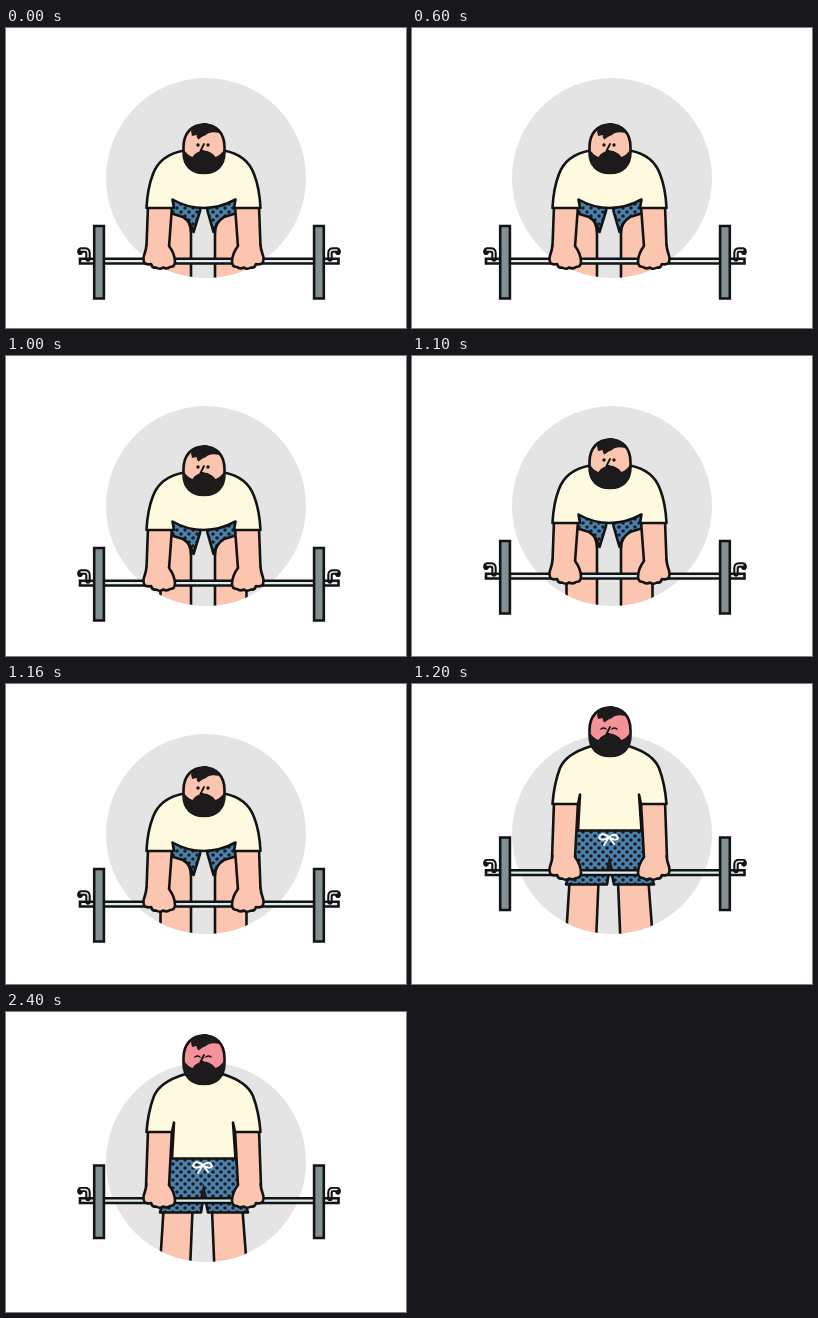
An HTML page that plays this animation: 400 px wide and 300 px high, repeating every 3.2 s.

```html
<!DOCTYPE html>
<html lang="en">
<head>
<meta charset="utf-8">
<title>Deadlift</title>
<style>
  html, body { margin: 0; width: 100%; height: 100%; overflow: hidden; background: #fff; }
  svg { display: block; width: 100vw; height: 100vh; }
  .line { stroke: #131313; stroke-width: 2.6; stroke-linejoin: round; stroke-linecap: round; fill: none; }
  .sharp { stroke-linejoin: miter; }
  .ink { fill: #1c1a1b; }
  .skin { fill: #fbc5b0; }
  .shirt { fill: #fefae0; }
  .shorts { fill: url(#dots); }
  .steel { fill: #819092; }
  .bar { fill: #dcecf0; }
</style>
</head>
<body>
<svg viewBox="0 0 400 300">
  <defs>
    <pattern id="dots" width="8" height="8" patternUnits="userSpaceOnUse" patternTransform="translate(1 2)">
      <path fill="#4a83b0" d="M0 0h8v8h-8z"/>
      <g class="ink"><circle cx="2" cy="2" r="1.8"/><circle cx="6" cy="6" r="1.8"/></g>
    </pattern>
    <clipPath id="disc"><circle cx="200" cy="150" r="100"/></clipPath>
    <g id="weight">
      <g fill="none" stroke-linecap="round">
        <path id="hook" d="M82 231V225Q82 222 79 222H75Q73.500 222 74 224.500" stroke="#131313" stroke-width="5"/>
        <use href="#hook"/>
        <path d="M82 229V225Q82 222 79 222H75" stroke="#e9f1f2" stroke-width="1.4"/>
      </g>
      <path class="line sharp steel" d="M88.200 198h9.700v72.500h-9.700z"/>
    </g>
    <path id="hand" class="line skin" d="M140.500 217Q140 222 138.500 226Q136.500 231 138.500 235Q141 237 145 236Q146.500 240.500 150 239.500Q154 242 157 239.500Q161 241.500 164 239Q169 239 169 233.500Q168.500 225 163 218"/>
  </defs>

  <circle cx="200" cy="150" r="100" fill="#e4e4e4"/>

  <g id="bent">
    <g clip-path="url(#disc)"><g class="bentBody">
      <path class="line skin" d="M154.500 290V190Q166 179 177 187Q185 193 185 206V290z"/>
      <path class="line skin" d="M240.500 290V190Q229 179 218 187Q209 193 209 206V290z"/>
    </g></g>
    <g class="bentBody">
      <path class="line shorts" d="M164 168H195.500L194 183L187.500 204Q184 193 177 189L164 185z"/>
      <path class="line shorts" d="M231 168H200L201.500 183L207.500 204Q211 193 218 189L231 185z"/>
    </g>
  </g>

  <g id="upright">
    <g clip-path="url(#disc)">
      <path class="line skin" d="M157.500 198L153 270H183.500L186.500 198zM206 198L209 270H242L236.500 198z"/>
    </g>
    <path class="line shorts" d="M164 146H230.500Q233 175 242 200.500H202L198 181L195 200.500H154Q162 175 164 146z"/>
    <path class="ink" d="M197.500 171L201 186H194z"/>
    <path d="M197 153Q189 147 187 154Q190 158 197 153Q204 148 206 154Q204 158 197 153L192 161M197 153L202 160" fill="none" stroke="#fff" stroke-width="2" stroke-linecap="round"/>
  </g>

  <g id="barbell">
    <path class="line sharp bar" d="M74 230.700H332.500V235.500H74z"/>
    <use href="#weight"/>
    <use href="#weight" transform="translate(406) scale(-1 1)"/>
  </g>

  <g id="bentArms" class="bentBody">
    <path class="line skin" d="M142 178L140.500 218Q152 226 163 219L166 178zM253 178L254.500 218Q243 226 232 219L229 178z"/>
  </g>
  <g id="uprightArms">
    <path class="line skin" d="M142 118L140 174Q150 180 163 174L166 118zM253 118L255 174Q245 180 232 174L229 118z"/>
  </g>
  <g id="hands">
    <use href="#hand"/><use href="#hand" transform="translate(395) scale(-1 1)"/>
  </g>

  <g id="bentShirt" class="bentBody">
    <path class="line shirt" d="M178 122.500Q154 127 147 146Q141.500 160 140.500 180H168L166.500 171.500Q181 180 198 180Q214 180 229.500 171.500L228 180H254.500Q253.500 160 248 146Q241 127 218 122.500z"/>
  </g>
  <path id="uprightShirt" class="line shirt" d="M178 62.500Q154 70 148 84Q142 100 140.500 120H166L168 110.500L166 146.500H229.500L227 110.500L229 120H254.500Q253 100 247 84Q241 70 218 62.500z"/>

  <g id="head">
    <path id="face" class="line" d="M177.500 119C177.500 105 186 96.500 198 96.500S218.500 105 218.500 119V124C218.500 138 210 145 198 145S177.500 138 177.500 124z"/>
    <path class="ink" d="M177 120.500Q181 127 186.500 129Q190 123 198 122.500Q205 123 209.500 129Q215 127 219 120.500V124C219 138 210 146 198 146S177 138 177 124z"/>
    <path class="ink" d="M185 103Q188 97.500 192 98Q195 94.500 200 95Q209 97 213 105Q204 103 200 107Q196 108 192.500 111.500Q190 109 191 107L186 108z"/>
    <path class="line" style="stroke-width:1.8" d="M198 116L194.500 123H197"/>
    <g id="open" class="ink"><circle cx="192" cy="117" r="1.700"/><circle cx="202" cy="117" r="1.700"/></g>
    <path id="shut" class="line" style="stroke-width:1.600" d="M189 118Q191.500 116 194 118M200 118Q202.500 116 205 118"/>
  </g>
</svg>
<script>
  const $ = id => document.getElementById(id);
  const move = (el, y) => el.setAttribute('transform', `translate(0 ${y})`);
  const show = (on, ...ids) => ids.forEach(id => $(id).style.display = on ? '' : 'none');
  const bentBody = document.querySelectorAll('.bentBody');

  function pose(t) {
    const up = t >= 1200;
    const lift = t < 1000 ? 0 : t < 1100 ? -6 : -13;
    show(!up, 'bent', 'bentArms', 'bentShirt', 'open');
    show(up, 'upright', 'uprightArms', 'uprightShirt', 'shut');
    bentBody.forEach(el => move(el, lift));
    move($('barbell'), up ? -44.5 : lift);
    move($('hands'), up ? -45 : lift);
    move($('head'), up ? -73 : lift);
    $('face').style.fill = up ? '#f4929a' : '#fbc5b0';
  }

  const start = performance.now();
  function frame() {
    pose((performance.now() - start) % 3200);
    requestAnimationFrame(frame);
  }
  frame();
</script>
</body>
</html>
```
